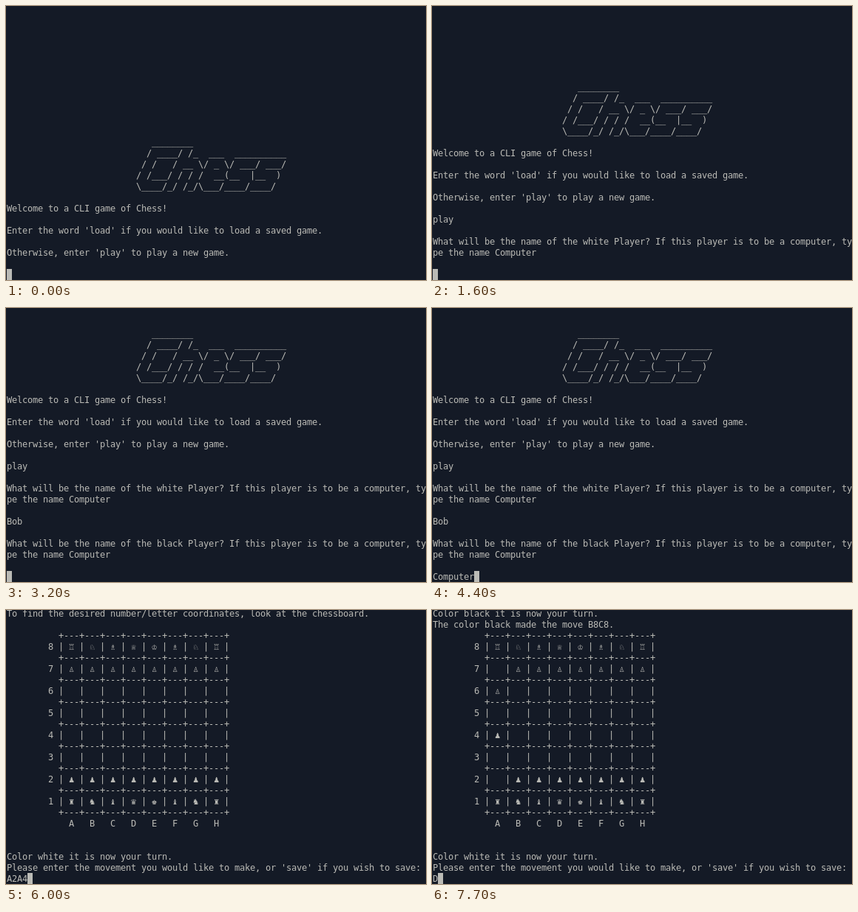
An HTML page with a canvas that plays this animation: 568x372 px, repeating every 8000 ms.

```html
<!DOCTYPE html>
<html lang="en">
<head>
<meta charset="utf-8">
<title>Terminal chess</title>
<style>
  html, body { margin: 0; width: 100%; height: 100%; overflow: hidden; background: #141a26; }
  canvas { display: block; }
</style>
</head>
<body>
<canvas id="screen" width="568" height="372"></canvas>
<script>
const LOOP = 8000, COLS = 81, ROWS = 25;
const CELL_W = 7, CELL_H = 15, LEFT = 1, TOP = -3, BASELINE = 12;
const BACK = '#141a26', INK = '#bbbbb6';

const indent = (n, text) => ' '.repeat(n) + text;

const logo = String.raw`
   ________
  / ____/ /_  ___  __________
 / /   / __ \/ _ \/ ___/ ___/
/ /___/ / / /  __(__  |__  )
\____/_/ /_/\___/____/____/`.split('\n').slice(1).map(row => indent(25, row));

const wrap = text => text.match(new RegExp(`.{1,${COLS}}`, 'g'));

const askName = color => ['', ...wrap(
  `What will be the name of the ${color} Player? If this player is to be a computer, type the name Computer`
), ''];

const turn = color => `Color ${color} it is now your turn.`;
const moved = (color, move) => `The color ${color} made the move ${move}.`;
const askMove = "Please enter the movement you would like to make, or 'save' if you wish to save:";

// Ranks run from 8 down to 1, one character per square.
const ranks = ['♖♘♗♕♔♗♘♖', '♙♙♙♙♙♙♙♙', ...Array(4).fill(' '.repeat(8)), '♟♟♟♟♟♟♟♟', '♜♞♝♛♚♝♞♜'];

function movePiece(from, to) {
  const at = square => [8 - square[1], square.charCodeAt(0) - 65];
  const put = ([r, c], piece) => {
    ranks[r] = ranks[r].slice(0, c) + piece + ranks[r].slice(c + 1);
  };
  const [r, c] = at(from), piece = ranks[r][c];
  put([r, c], ' ');
  put(at(to), piece);
}

function board() {
  const border = indent(10, '+' + '---+'.repeat(8));
  const rows = ranks.flatMap((rank, i) => [
    indent(8, `${8 - i} | ${[...rank].join(' | ')} |`), border
  ]);
  return [border, ...rows, indent(12, [...'ABCDEFGH'].join('   ')), '', ''];
}

// Each snapshot holds the visible lines; the last one is the input line.
const snapshots = [];
let lines = [];
const snap = (time, input) => snapshots.push({ time, rows: [...lines, input].slice(-ROWS) });
const type = keys => keys.forEach(([time, input]) => snap(time, input));
function print(time, ...output) {
  lines = [...lines, ...output];
  snap(time, '');
}

print(0, ...logo, '', 'Welcome to a CLI game of Chess!', '',
  "Enter the word 'load' if you would like to load a saved game.", '',
  "Otherwise, enter 'play' to play a new game.", '');
type([[800, 'p'], [900, 'pl'], [1000, 'pla'], [1100, 'play']]);
print(1600, 'play', ...askName('white'));
type([[2800, 'B'], [3000, 'Bo'], [3100, 'Bob']]);
print(3200, 'Bob', ...askName('black'));
type([[3600, 'C'], [3800, 'Co'], [3900, 'Com'], [4000, 'Comp'],
  [4200, 'Compu'], [4300, 'Compute'], [4400, 'Computer']]);
print(4500, 'Computer',
  'To find the desired number/letter coordinates, look at the chessboard.', '',
  ...board(), turn('white'), askMove);
type([[5100, 'A'], [5500, 'A2'], [5800, 'A2A'], [6000, 'A2A4']]);
movePiece('A2', 'A4');
print(6300, 'A2A4', moved('white', 'A2A4'), ...board(), turn('black'));
movePiece('A7', 'A6');
print(6500, moved('black', 'B8C8'), ...board(), turn('white'), askMove);
type([[7700, 'D']]);

const ctx = document.getElementById('screen').getContext('2d', { alpha: false });

function draw({ rows }) {
  ctx.fillStyle = BACK;
  ctx.fillRect(0, 0, 568, 372);
  ctx.fillStyle = INK;
  ctx.font = '12px "DejaVu Sans Mono", monospace';
  const first = ROWS - rows.length;
  rows.forEach((text, i) => {
    const y = TOP + (first + i) * CELL_H + BASELINE;
    [...text].forEach((char, col) => {
      if (char !== ' ') ctx.fillText(char, LEFT + col * CELL_W, y);
    });
  });
  const cursor = rows[rows.length - 1].length;
  ctx.fillRect(LEFT + cursor * CELL_W, TOP + (ROWS - 1) * CELL_H, CELL_W, CELL_H);
}

const start = performance.now();
let shown;
function tick() {
  const time = (performance.now() - start) % LOOP;
  const current = snapshots.findLast(s => s.time <= time) || snapshots[0];
  if (current !== shown) draw(shown = current);
  requestAnimationFrame(tick);
}
tick();
</script>
</body>
</html>
```
